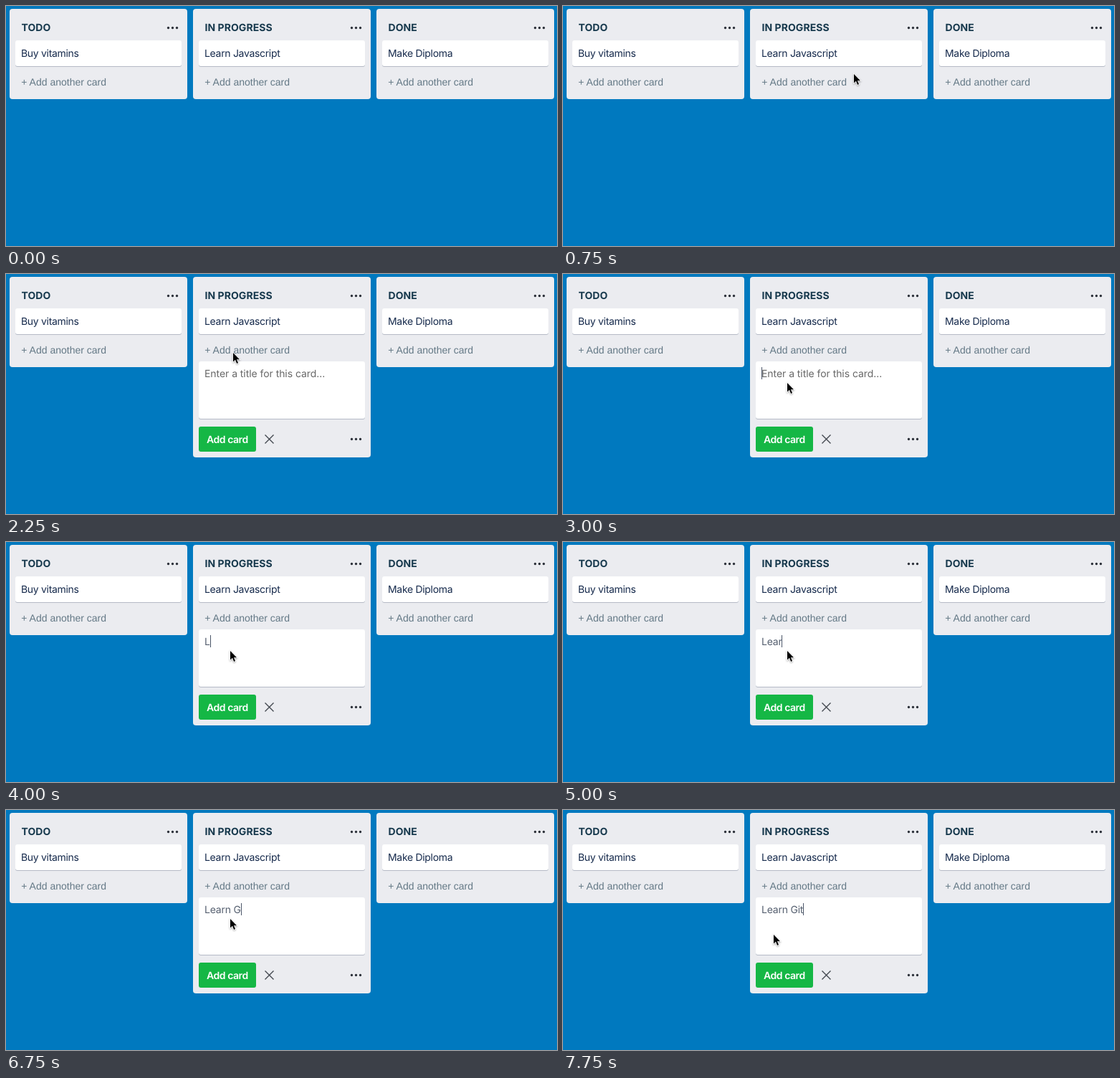
Recreate the animation shown at these times as an HTML page. Size 769 by 335 pixels, loop 8 s.

```html
<!DOCTYPE html>
<html lang="en">
<head>
<meta charset="utf-8">
<title>Task board</title>
<style>
  html, body { margin: 0; width: 100%; height: 100%; overflow: hidden; background: #0079bf; }
  svg { display: block; width: 769px; height: 335px; }
  text { font: 400 14px Inter, sans-serif; letter-spacing: -.31px; fill: #172b4d; white-space: pre; text-rendering: geometricPrecision; }
  .title { font-weight: 700; letter-spacing: .06px; fill: #17394d; }
  .add { font-family: "Liberation Sans", Arial, sans-serif; letter-spacing: 0; fill: #647986; }
  .hint { letter-spacing: -.06px; fill: #686868; }
  .typed { letter-spacing: -.22px; fill: #566070; }
  .button { font-weight: 600; letter-spacing: -.45px; fill: #fff; }
  #cursor { filter: drop-shadow(0 1px .8px rgba(0, 0, 0, .35)); }
</style>
</head>
<body>
<svg viewBox="0 0 769 335" xmlns="http://www.w3.org/2000/svg">
  <rect width="769" height="335" fill="#0079bf"/>
  <g id="lists"></g>
  <g id="form"></g>
  <path id="cursor" d="M1 1V13.6L4 10.8L6.1 15.9L8 15.1L5.9 10.2H10Z" fill="#000" stroke="#fff" stroke-width="1.5" paint-order="stroke"/>
</svg>
<script>
const LOOP = 8000, TICK = 250, STROKE = 500;
const APPEAR = 250, OPEN = 2250, FOCUS = 3000, TYPE = 4000;
const LEFT = 277;
const $ = id => document.getElementById(id);

const box = (x, y, w, h, fill, r = 3, id = '') =>
  `<rect id="${id}" x="${x}" y="${y}" width="${w}" height="${h}" rx="${r}" fill="${fill}"/>`;
const card = (x, y, h) => box(x, y + 1, 232, h, '#b5bac6') + box(x, y, 232, h, '#fff');
const label = (x, y, str, cls = '', id = '') =>
  `<text id="${id}" class="${cls}" x="${x}" y="${y}">${str}</text>`;
const dots = (x, y) => [0, 6, 12].map(d =>
  `<circle cx="${x + d}" cy="${y}" r="1.65" fill="#2b2f38"/>`).join('');

const list = (x, title, task, i) =>
  box(x, 4, 248, 126, '#ebecf0', 4, 'list' + i) +
  label(x + 16.5, 35, title, 'title') + dots(x + 221.5, 30.5) +
  card(x + 8, 48, 36) + label(x + 16, 71, task) +
  label(x + 16.3, 111, '+ Add another card', 'add');

$('lists').innerHTML = [
  ['TODO', 'Buy vitamins'],
  ['IN PROGRESS', 'Learn Javascript'],
  ['DONE', 'Make Diploma']
].map(([title, task], i) => list(5 + 256 * i, title, task, i)).join('');

$('form').innerHTML =
  card(269, 122, 80) +
  label(LEFT, 144, 'Enter a title for this card...', 'hint', 'hint') +
  label(LEFT, 144, '', 'typed', 'typed') +
  box(LEFT, 130, 1, 17, '#4a5568', 0, 'caret') +
  box(269, 213, 80, 35, '#15b745') +
  label(280, 236, 'Add card', 'button') +
  '<path d="M361.5 224.5l12 12m0-12l-12 12" stroke="#42474f" stroke-width="1.4"/>' +
  dots(482.5, 230.5);

// One character per tick; a dot is a pause
const keys = 'L.ear..n.. G.it';

// Pointer strokes, each a quadratic curve
const strokes = [
  { at: 500, bend: [393, 127], end: [352, 106] },
  { at: 1750, bend: [318, 110], end: [316, 109] },
  { at: 2250, bend: [316, 106], end: [312, 151] },
  { at: 7500, bend: [293, 173], end: [274, 195] }
];

function pointer(t) {
  let pos = [482, 15];
  for (const { at, bend, end } of strokes) {
    const p = Math.min(1, Math.max(0, (t - at) / STROKE)), q = 1 - p;
    if (p) pos = pos.map((a, i) => q * q * a + 2 * q * p * bend[i] + p * p * end[i]);
  }
  return pos.map(Math.round);
}

function typing(t) {
  const done = keys.slice(0, Math.max(0, (t - TYPE) / TICK + 1));
  const pause = done.match(/\.*$/)[0].length;
  const last = done ? TYPE + (done.length - 1 - pause) * TICK : FOCUS;
  return { text: done.replaceAll('.', ''), blink: t >= FOCUS && (t - last) % 1000 < 500 };
}

const show = (id, on) => $(id).setAttribute('visibility', on ? 'inherit' : 'hidden');

function draw(time) {
  const t = Math.floor(time / TICK) * TICK;
  const open = t >= OPEN;
  $('list1').setAttribute('height', open ? 252 : 126);
  show('form', open);

  const { text, blink } = typing(t);
  $('typed').textContent = text;
  show('hint', open && !text);
  show('caret', open && blink);
  $('caret').setAttribute('x', LEFT + Math.round(text && $('typed').getComputedTextLength()));

  show('cursor', t >= APPEAR);
  $('cursor').setAttribute('transform', `translate(${pointer(t)})`);
}

const start = performance.now();
function tick() {
  draw((performance.now() - start) % LOOP);
  requestAnimationFrame(tick);
}
draw(0);
requestAnimationFrame(tick);
</script>
</body>
</html>
```
